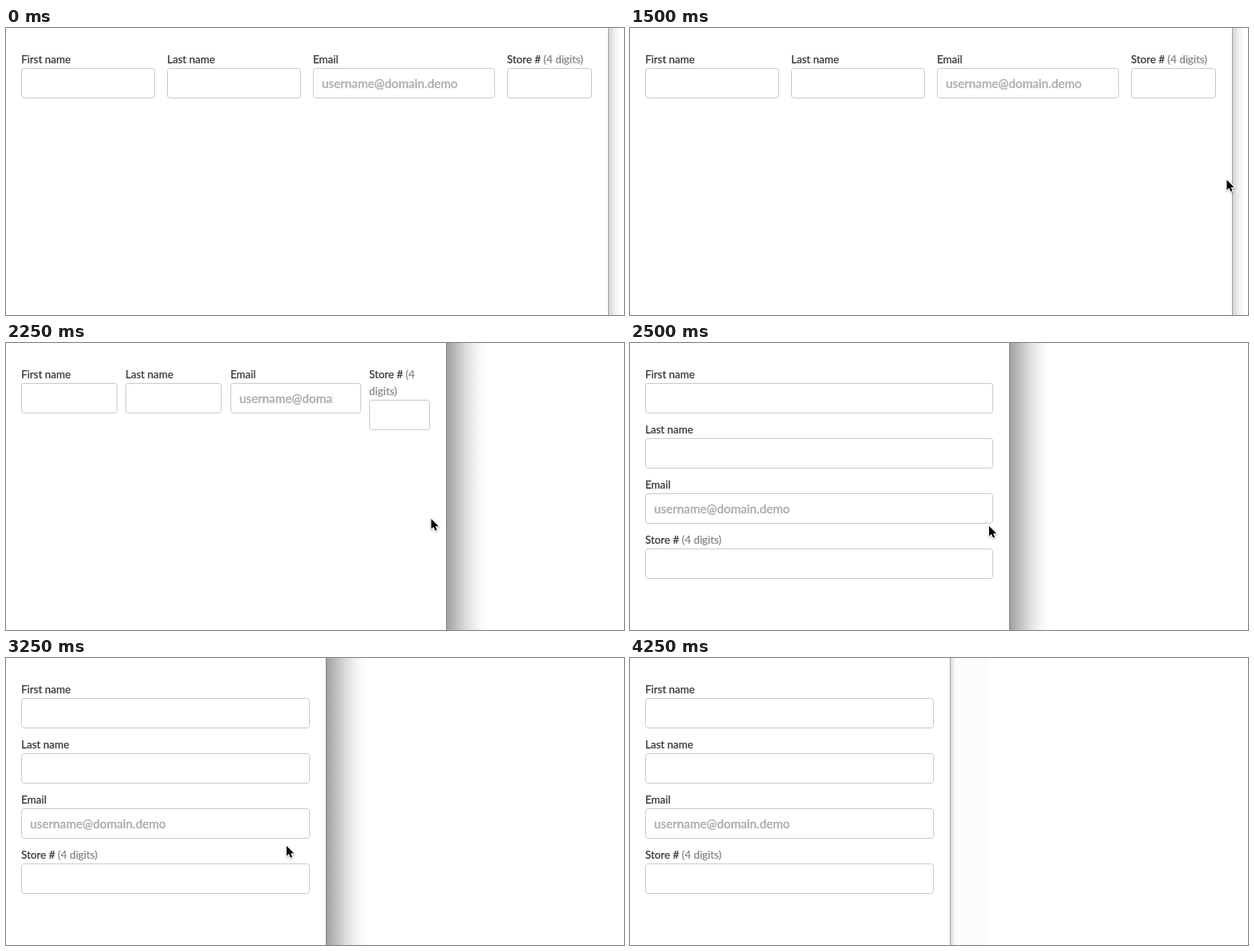
Recreate the animation shown at these times as an HTML page with a canvas. Size 771x359 px, loop 5 s.

```html
<!DOCTYPE html>
<html lang="en">
<head>
<meta charset="utf-8">
<title>Responsive form</title>
<style>
html, body { margin: 0; width: 100%; height: 100%; overflow: hidden; background: #fff; }
canvas { display: block; }
</style>
</head>
<body>
<canvas id="stage" width="771" height="359"></canvas>
<script>
const ctx = document.getElementById('stage').getContext('2d');
const STAGE_W = 771, STAGE_H = 359, LOOP = 5000;
const LEFT = 19, FIELD_H = 38, ROW = 69, LINE = 21, STACK_BELOW = 500;
const LABEL_FONT = '13.4px Lato, "Open Sans", sans-serif';
const HINT_FONT = '15.3px Lato, "Open Sans", sans-serif';

// Column start and width as shares of the form width
const fields = [
  { label: 'First name', at: 0, span: 0.2345 },
  { label: 'Last name', at: 0.2556, span: 0.2345 },
  { label: 'Email', at: 0.5112, span: 0.319, hint: 'username@domain.demo' },
  { label: 'Store #', note: '(4 digits)', at: 0.851, span: 0.149 }
];

const steps = [
  { t: 0, edge: 751, shade: 'edge' },
  { t: 750, edge: 751, shade: 'edge', tip: [753, 183] },
  { t: 1000, edge: 751, shade: 'edge', tip: [747, 185] },
  { t: 1250, edge: 751, shade: 'edge', tip: [745, 190] },
  { t: 1500, edge: 751, shade: 'edge', tip: [744.5, 190] },
  { t: 2000, edge: 694, shade: 'active', tip: [662.5, 204] },
  { t: 2250, edge: 549, shade: 'active', tip: [530.5, 220] },
  { t: 2500, edge: 473, shade: 'active', tip: [448, 229] },
  { t: 2750, edge: 399, shade: 'active', tip: [373.5, 234] },
  { t: 3000, edge: 399, shade: 'active', tip: [351, 235] },
  { t: 3250, edge: 399, shade: 'active', tip: [350, 235] },
  { t: 3500, edge: 399, shade: 'active', tip: [476, 210] },
  { t: 3750, edge: 399, shade: 'active' },
  { t: 4250, edge: 399, shade: 'idle' }
];

const shades = {
  edge: { line: '#a0a0a0', width: 13, stops: [[0, '#d2d2d2'], [0.5, '#ededed'], [1, '#fdfdfd']] },
  active: { line: '#808080', width: 49, stops: [[0, '#a0a0a0'], [0.2, '#b9b9b9'], [0.5, '#dedede'], [0.75, '#f3f3f3'], [1, '#fff']] },
  idle: { line: '#a4a4a4', width: 7, stops: [[0, '#d4d4d4'], [0.5, '#f0f0f0'], [1, '#fcfcfc']], haze: 48 }
};

function drawShade(edge, shade) {
  const x = edge + 1;
  if (shade.haze) {
    ctx.fillStyle = '#fcfcfc';
    ctx.fillRect(x, 0, shade.haze, STAGE_H);
  }
  const fade = ctx.createLinearGradient(x, 0, x + shade.width, 0);
  for (const [pos, color] of shade.stops) fade.addColorStop(pos, color);
  ctx.fillStyle = fade;
  ctx.fillRect(x, 0, shade.width, STAGE_H);
  ctx.fillStyle = shade.line;
  ctx.fillRect(edge, 0, 1, STAGE_H);
}

function text(str, x, y, color, weight) {
  ctx.fillStyle = ctx.strokeStyle = color;
  ctx.lineWidth = weight;
  ctx.fillText(str, x, y);
  ctx.strokeText(str, x, y);
}

// Draws a wrapping label and returns the height added by extra lines
function drawLabel(field, x, y, width) {
  ctx.font = LABEL_FONT;
  const space = ctx.measureText(' ').width;
  const split = (str, color) => (str || '').split(' ').filter(Boolean).map(word => ({ word, color }));
  const lines = [[]];
  let used = 0;
  for (const part of [...split(field.label, '#333'), ...split(field.note, '#858585')]) {
    const w = ctx.measureText(part.word).width;
    if (used && used + w > width) {
      lines.push([]);
      used = 0;
    }
    lines[lines.length - 1].push({ ...part, dx: used });
    used += w + space;
  }
  lines.forEach((line, i) => {
    for (const p of line) text(p.word, x + p.dx, y + i * LINE, p.color, 0.25);
  });
  return (lines.length - 1) * LINE;
}

function drawField(field, x, y, width) {
  const top = y + 6 + drawLabel(field, x, y, width);
  ctx.strokeStyle = '#c1cad1';
  ctx.lineWidth = 1;
  ctx.beginPath();
  ctx.roundRect(x + 0.5, top + 0.5, width - 1, FIELD_H - 1, 3);
  ctx.stroke();
  if (!field.hint) return;
  ctx.save();
  ctx.beginPath();
  ctx.rect(x + 10, top, width - 45, FIELD_H);
  ctx.clip();
  ctx.font = HINT_FONT;
  text(field.hint, x + 11, top + 25, '#aaa', 0.4);
  ctx.restore();
}

function drawForm(edge) {
  const total = edge - 39;
  const stacked = edge < STACK_BELOW;
  fields.forEach((field, i) => {
    if (stacked) drawField(field, LEFT, 44 + i * ROW, total);
    else {
      const x = Math.round(LEFT + field.at * total);
      drawField(field, x, 44, Math.round(field.span * total));
    }
  });
}

function drawCursor([x, y]) {
  ctx.save();
  ctx.translate(x, y);
  const arrow = new Path2D('M0 0V12.6L3 9.9L5.1 14.7L7.2 13.8L5.1 9.2H9.2Z');
  ctx.shadowColor = 'rgba(0,0,0,.3)';
  ctx.shadowBlur = 2;
  ctx.shadowOffsetY = 1;
  ctx.strokeStyle = '#fff';
  ctx.lineWidth = 2;
  ctx.stroke(arrow);
  ctx.shadowColor = 'transparent';
  ctx.fillStyle = '#000';
  ctx.fill(arrow);
  ctx.restore();
}

function draw(now) {
  const t = now % LOOP;
  const step = steps.filter(s => s.t <= t).pop();
  ctx.fillStyle = '#fff';
  ctx.fillRect(0, 0, STAGE_W, STAGE_H);
  drawShade(step.edge, shades[step.shade]);
  drawForm(step.edge);
  if (step.tip) drawCursor(step.tip);
}

let start;
function tick(now) {
  start ??= now;
  draw(Math.max(0, now - start));
  requestAnimationFrame(tick);
}
requestAnimationFrame(tick);
</script>
</body>
</html>
```
